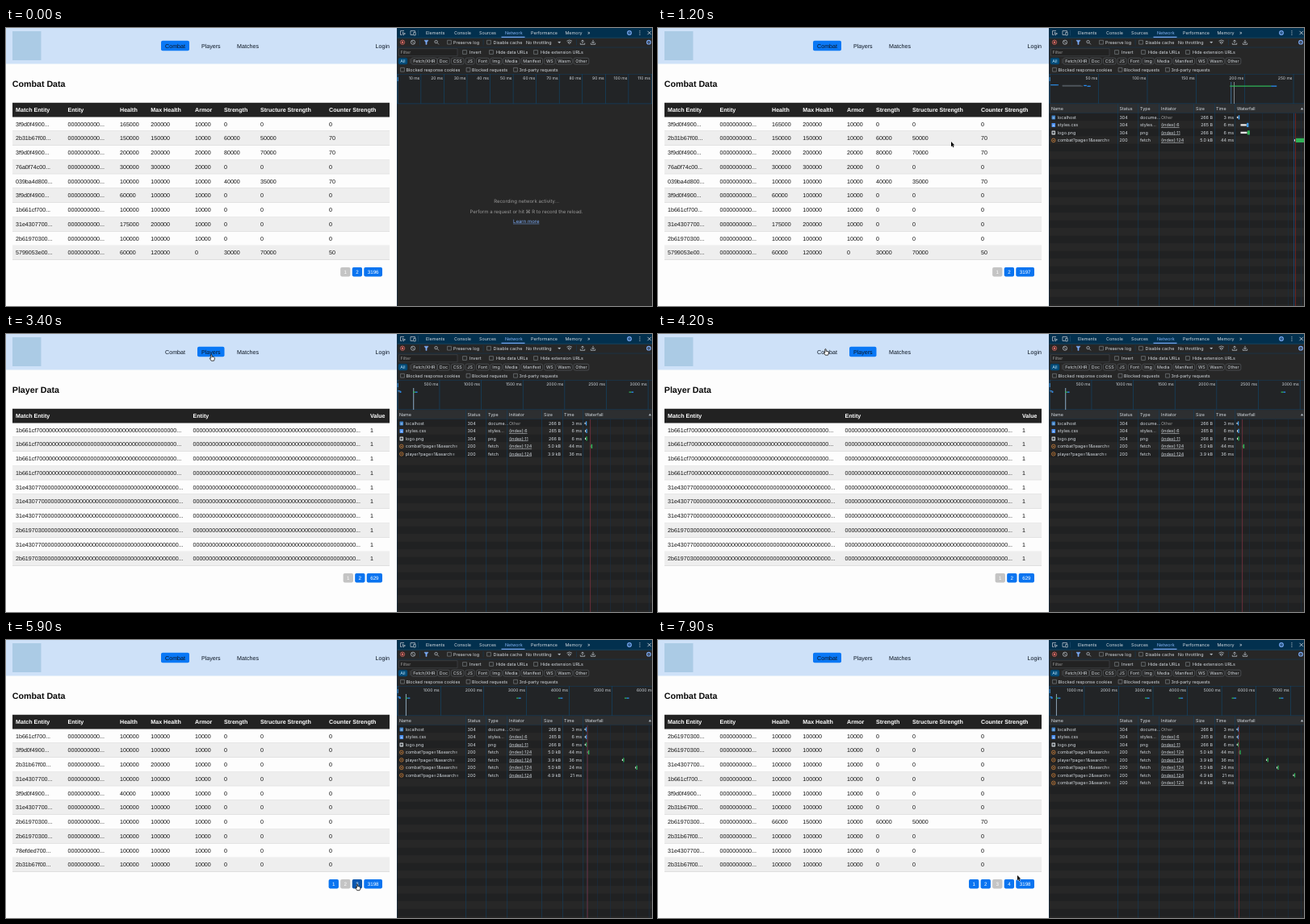
Animation, 800 px wide and 345 px high, one loop 8 s. Source, as an HTML page with a canvas:

```html
<!DOCTYPE html>
<html lang="en">
<head>
<meta charset="utf-8">
<title>Combat Data</title>
<style>
  html, body { margin: 0; width: 100%; height: 100%; overflow: hidden; background: #fdfdfd; }
  canvas { display: block; }
</style>
</head>
<body>
<canvas id="stage" width="800" height="345"></canvas>
<script>
const ctx = document.getElementById('stage').getContext('2d');
const LOOP = 8000;

const font = (size, family, weight = '') => ({ css: `${weight} ${size}px ${family}`, drop: size * 0.36 });
const ARIAL = '"Liberation Sans", Arial, sans-serif';
const UI = 'Inter, Roboto, sans-serif';
const BODY = font(7.11, ARIAL), HEAD = font(7.11, ARIAL, 'bold'), TITLE = font(10.67, ARIAL, 'bold');
const PAGER = font(6.22, ARIAL), TOOL = font(5.4, UI), AXIS = font(5, UI), NOTE = font(6, UI);

const LINE = '#123f60', PALE = '#d6dce2', GREY = '#9a9a9a', ICON = '#b4bcc4', BLUE = '#7cacf8';

function rect(x, y, w, h, color, radius = 0) {
  ctx.fillStyle = color;
  ctx.beginPath();
  ctx.roundRect(x, y, w, h, radius);
  ctx.fill();
}

function stroke(path, color = ICON, width = 0.8, fill) {
  const p = typeof path === 'string' ? new Path2D(path) : path;
  if (fill) { ctx.fillStyle = fill; ctx.fill(p); }
  ctx.strokeStyle = color;
  ctx.lineWidth = width;
  ctx.stroke(p);
}

function ring(x, y, r, color = ICON, width = 0.8) {
  const p = new Path2D();
  p.arc(x, y, r, 0, 7);
  stroke(p, color, width);
}

// y is the vertical middle of the capitals
function text(str, x, y, f, color, align = 'left') {
  ctx.font = f.css;
  ctx.fillStyle = color;
  ctx.textAlign = align;
  ctx.fillText(str, x, y + f.drop);
  return ctx.measureText(str).width;
}

function link(str, x, y, f, color) {
  const w = text(str, x, y, f, color);
  rect(x, y + f.drop + 0.7, w, 0.5, color);
}

/* ---------- data ---------- */

// entity, then health, max health, armor, strength, structure (thousands), counter
const DEFAULTS = [100, 100, 10, 0, 0, 0];
const parse = rows => rows.split(',').map(row => {
  const [id, ...stats] = row.split(' ');
  const values = DEFAULTS.map((d, i) => (stats[i] ?? d) * (i < 5 ? 1000 : 1));
  return [id + '00...', '0'.repeat(10) + '...', ...values];
});
const combatPages = [
  '3f9d0f49 165 200,2b31b67f 150 150 10 60 50 70,3f9d0f49 200 200 20 80 70 70,76a0f74c 300 300 20,' +
    '039ba4d8 100 100 10 40 35 70,3f9d0f49 60,1b661cf7,31e43077 175 200,2b619703,5799053e 60 120 0 30 70 50',
  '1b661cf7,3f9d0f49,2b31b67f 100 200,31e43077,3f9d0f49 40,31e43077,2b619703,2b619703,78efded7,2b31b67f',
  '2b619703,2b619703,31e43077,1b661cf7,3f9d0f49,2b31b67f,2b619703 66 150 10 60 50 70,2b31b67f,31e43077,2b31b67f'
].map(parse);

const [A, B, C] = ['1b661cf7', '31e43077', '2b619703'];
const players = [A, A, A, A, B, B, B, C, B, C]
  .map(id => [id.padEnd(51, '0') + '...', '0'.repeat(51) + '...', 1]);

const combatColumns = {
  'Match Entity': 12, 'Entity': 76.5, 'Health': 141, 'Max Health': 179.3, 'Armor': 234,
  'Strength': 270, 'Structure Strength': 315, 'Counter Strength': 400
};
const playerColumns = { 'Match Entity': 12, 'Entity': 231.5, 'Value': 451 };

// start, wait and download in ms
const req = (name, status, type, initiator, size, time, start, wait, load, color) =>
  ({ name, status, type, initiator, size, time, start, wait, load, color });
const api = (name, size, time, start) =>
  req(name + '&search=', 200, 'fetch', '(index):124', size + ' kB', time, start, 4, time, '#2fb457');
const requests = [
  req('localhost', 304, 'docume...', 'Other', '266 B', 3, 1, 4, 4, '#3f9bea'),
  req('styles.css', 304, 'styles...', '(index):6', '265 B', 6, 13, 19, 6, '#3f9bea'),
  req('logo.png', 304, 'png', '(index):11', '266 B', 6, 13, 21, 8, '#2fb457'),
  api('combat?page=1', '5.0', 44, 185),
  api('player?page=1', '3.9', 36, 2775),
  api('combat?page=1', '5.0', 24, 3750),
  api('combat?page=2', '4.9', 21, 5300),
  api('combat?page=3', '4.9', 19, 6670)
];

// span: ms across the overview; rate: waterfall px per ms
const scenes = [
  { at: 0, page: 1, last: 3196, count: 0, tick: 10, span: 110.3 },
  { at: 800, page: 1, last: 3197, count: 4, tick: 50, span: 261, rate: 0.384 },
  { at: 3400, page: 1, last: 629, count: 5, tick: 500, span: 3050, rate: 0.036, players: true },
  { at: 4400, page: 1, last: 3198, count: 6, tick: 500, span: 3780, rate: 0.0239 },
  { at: 5900, page: 2, last: 3198, count: 7, tick: 1000, span: 5940, rate: 0.0167 },
  { at: 7300, page: 3, last: 3198, count: 8, tick: 1000, span: 7400, rate: 0.0132 }
];

// time, x, y of the pointer tip
const track = [
  [800, 180, -12], [1200, 363, 141], [1400, 363, 141], [1500, 352, 136], [1700, 316, 158],
  [1850, 316, 158], [2200, 258, 30], [2400, 258, 30], [2600, 254.5, 25.5], [3600, 254.5, 25.5],
  [4150, 207.5, 18.5], [4700, 207.5, 18.5], [5000, 427.7, 309.7], [5500, 435, 303],
  [6250, 435, 303], [6600, 447, 305], [6750, 447, 305], [6900, 440, 304],
  [7600, 440, 304], [7900, 445, 292]
];

function pointerAt(t) {
  if (t < track[0][0]) return null;
  const i = track.findIndex(k => k[0] > t);
  if (i < 0) return track.at(-1).slice(1);
  const [t0, x0, y0] = track[i - 1], [t1, x1, y1] = track[i];
  const u = (t - t0) / (t1 - t0), e = u * u * (3 - 2 * u);
  return [x0 + (x1 - x0) * e, y0 + (y1 - y0) * e];
}

/* ---------- web page ---------- */

const within = (p, x, y, w, h) => p && p[0] >= x && p[0] <= x + w && p[1] >= y && p[1] <= y + h;

// Both return whether the pointer is over a button
function drawNav(scene, pointer) {
  rect(0, 0, 484, 44.5, '#cee1f8');
  rect(8, 4, 35.5, 36, '#abcbe5');
  let over = false;
  [['Combat', 192, 35], ['Players', 237, 33.5], ['Matches', 281, 37]].forEach(([name, x, w], i) => {
    if (i === (scene.players ? 1 : 0)) rect(x, 15.7, w, 12.6, '#0a78f5', 2);
    text(name, x + w / 2, 22, BODY, '#0b1522', 'center');
    over ||= within(pointer, x, 15.7, w, 12.6);
  });
  text('Login', 475, 22, BODY, '#0b1522', 'right');
  return over;
}

function drawTable(columns, rows) {
  const xs = Object.values(columns), pitch = 17.76, top = 110.3;
  rect(8, 92.8, 467, 17.6, '#222');
  Object.entries(columns).forEach(([name, x]) => text(name, x, 101.6, HEAD, '#fff'));
  rows.forEach((row, i) => {
    const y = top + i * pitch;
    if (i % 2) rect(8, y, 467, pitch, '#eee');
    rect(8, y + pitch - 0.5, 467, 0.5, '#d2d2d2');
    row.forEach((cell, c) => text(cell, xs[c], y + 8.8, BODY, '#111'));
  });
}

function drawPager({ page, last }, pointer) {
  let right = 466, over = false;
  const labels = [last, ...Array.from({ length: page + 1 }, (_, i) => page + 1 - i)];
  for (const label of labels) {
    ctx.font = PAGER.css;
    const w = ctx.measureText(label).width + 8.9, x = right - w, current = label === page;
    const hover = !current && within(pointer, x, 297, w, 11.4);
    rect(x, 297, w, 11.4, current ? '#c4c4c4' : hover ? '#0a56ad' : '#0a74f0', 1.8);
    text(label, x + w / 2, 302.7, PAGER, '#fff', 'center');
    over ||= hover;
    right = x - 2.2;
  }
  return over;
}

function drawPage(scene, pointer) {
  rect(0, 0, 484, 345, '#fdfdfd');
  const overNav = drawNav(scene, pointer);
  text(scene.players ? 'Player Data' : 'Combat Data', 7.8, 69, TITLE, '#0a0a0a');
  if (scene.players) drawTable(playerColumns, players);
  else drawTable(combatColumns, combatPages[scene.page - 1]);
  return drawPager(scene, pointer) || overNav;
}

/* ---------- developer tools ---------- */

function checkbox(x, y, label, labelX) {
  stroke(`M${x - 2.4} ${y - 2.4}h4.8v4.8h-4.8z`, '#858b91', 0.6);
  text(label, labelX, y, TOOL, PALE);
}

function gear(x, y) {
  ring(x, y, 2.3, BLUE, 1.2);
  ring(x, y, 0.6, BLUE, 0.5);
}

function drawToolbars() {
  rect(484, 0, 316, 345, '#272727');
  rect(484, 0, 316, 11.8, '#02304e');
  rect(484, 11.8, 316, 0.6, '#0b4c78');
  stroke('M493 3.5h-4.5v5h2M491 5.5l3.5 1.5-1.6.6-.6 1.5z');
  stroke('M501 3.5h5.5v1.5M501 3.5v5h3M504.7 5.5h2.5v3.5h-2.5z');
  rect(510.5, 2.5, 0.5, 7, '#2a587a');
  const tabs = { Elements: 520, Console: 555, Sources: 586, Network: 618, Performance: 650, Memory: 692.5 };
  for (const name in tabs) text(name, tabs[name], 6, TOOL, name === 'Network' ? '#8ab8fa' : PALE);
  rect(613.5, 10.7, 29, 1.2, BLUE);
  text('»', 720, 5.4, NOTE, PALE);
  gear(772, 6);
  [3.8, 6, 8.2].forEach(y => rect(784.4, y - 0.5, 1, 1, PALE));
  stroke('M794.5 3.8l4.4 4.4m0-4.4l-4.4 4.4', PALE);

  ring(491, 17.7, 2.7, '#e46962');
  rect(489.8, 16.5, 2.4, 2.4, '#e46962', 0.4);
  ring(504, 17.7, 2.6);
  stroke('M502.2 15.9l3.6 3.6');
  rect(512.3, 14, 0.5, 7.5, LINE);
  stroke('M518 15.2h5l-1.9 2.6v2.6h-1.2v-2.6z', BLUE, 0.5, BLUE);
  ring(532.6, 17.1, 1.7);
  stroke('M534 18.4l2 2');
  checkbox(549, 17.7, 'Preserve log', 554);
  rect(590.8, 14, 0.5, 7.5, LINE);
  checkbox(598, 17.7, 'Disable cache', 603.5);
  text('No throttling', 644, 17.7, TOOL, PALE);
  stroke('M683.4 16.9h3.6l-1.8 2z', ICON, 0.2, ICON);
  stroke('M694.5 16.2q3.2-2.4 6.4 0M695.8 17.8q1.9-1.3 3.8 0l-1.9 2z');
  rect(706.2, 14, 0.5, 7.5, LINE);
  stroke('M714 19v-4m-1.7 1.6l1.7-1.7 1.7 1.7M711.3 18.6v1.7h5.4v-1.7');
  stroke('M727 14.8v4m-1.7-1.6l1.7 1.7 1.7-1.7M724.3 18.6v1.7h5.4v-1.7');
  gear(796, 17.7);
  rect(484, 23.8, 316, 0.5, LINE);

  stroke('M486.5 25.7h72.5v9h-72.5z', '#4c5258', 0.5, '#222');
  text('Filter', 488.5, 30.2, TOOL, GREY);
  checkbox(568, 30, 'Invert', 574);
  checkbox(601, 30, 'Hide data URLs', 607);
  checkbox(656, 30, 'Hide extension URLs', 662);

  const chips = { 'All': 486, 'Fetch/XHR': 502, 'Doc': 534.5, 'CSS': 551.5, 'JS': 569, 'Font': 582.5, 'Img': 600,
    'Media': 615.7, 'Manifest': 638, 'WS': 666.7, 'Wasm': 681, 'Other': 703 };
  for (const name in chips) {
    ctx.font = TOOL.css;
    const w = ctx.measureText(name).width + 4.6, p = new Path2D();
    p.roundRect(chips[name], 37.2, w, 7.8, 1.8);
    const on = name === 'All';
    stroke(p, on ? '#004a77' : '#696f75', 0.5, on ? '#004a77' : '#272727');
    text(name, chips[name] + 2.3, 41.1, TOOL, on ? '#c2e7ff' : PALE);
    if (on) rect(500, 38, 0.5, 6, '#555');
  }
  checkbox(491, 51.7, 'Blocked response cookies', 495.5);
  checkbox(572.5, 51.7, 'Blocked requests', 577);
  checkbox(631, 51.7, '3rd-party requests', 635.5);
}

function drawOverview({ tick, span, count }) {
  const left = 485, scale = 315 / span;
  rect(484, 57, 316, 37, '#222426');
  rect(484, 57, 316, 0.6, LINE);
  for (let ms = tick; ms <= span + tick; ms += tick) {
    const x = left + ms * scale;
    rect(x, 57, 0.6, 37, '#12496f');
    text(ms + ' ms', x - 1.3, 62.2, AXIS, PALE, 'right');
  }
  rect(484.5, 57, 0.8, 37, '#1b6ca8');
  rect(484, 61, 1.8, 5, '#3b8fd6');
  rect(484, 93.6, 316, 0.7, LINE);
  if (!count) return;
  rect(left + 186 * scale, 67, 0.7, 27, '#4d8fc4');
  rect(left + 189 * scale, 67, 0.7, 27, '#a9b3ba');
  requests.slice(0, count).forEach((r, i) => {
    const x = left + r.start * scale, y = i < 3 ? 70 + i * 0.8 : 71.5;
    const w = Math.max(i < 3 ? 3 : 5.5, (r.wait + r.load) * scale);
    const part = Math.min(0.88, 0.4 + scale);
    if (i === 1 || i === 2) rect(x, y, r.wait * scale, 1, '#555e64');
    else rect(x, y, w * part, 1.3, i ? '#2fb457' : '#2a86d9');
    rect(x + w * part, y, w * (1 - part), 1.3, '#2a8cf0');
  });
}

function drawIcon(i, x, y) {
  if (i > 2) {
    ring(x, y, 2.3, '#e08a3c', 0.7);
    rect(x - 1, y - 0.4, 2, 0.8, '#e08a3c');
  } else {
    rect(x - 2.3, y - 2.5, 4.6, 5, ['#3d7fc4', '#4b8ff0', '#c9ced2'][i], 0.6);
    if (i < 2) stroke(`M${x - 1.2} ${y}h2.4M${x - 1.2} ${y + 1.2}h2.4`, '#dcecff', 0.5);
    else rect(x - 1.3, y - 1.2, 2.6, 2.4, '#4a4f54');
  }
}

function drawRequests({ count, rate }) {
  const left = 716.5, pitch = 9.5;
  rect(484, 94.3, 316, 10.9, '#2d2f31');
  const heads = { Name: 487, Status: 571.5, Type: 597, Initiator: 623, Size: 666, Time: 691, Waterfall: 717 };
  for (const name in heads) text(name, heads[name], 100, TOOL, PALE);
  stroke('M796 101.2h3l-1.5-2.4z', ICON, 0.2, ICON);
  rect(484, 105.2, 316, 0.5, LINE);
  for (let y = 105.8, i = 0; y < 345; y += pitch, i++) rect(484, y, 316, pitch, i % 2 ? '#272727' : '#202122');
  [569, 594.5, 620.5, 663, 689, 714.5].forEach(x => rect(x, 94.3, 0.6, 251, LINE));
  for (let x = 732; x < 800; x += 16) rect(x, 105.8, 0.5, 240, '#16314a');

  requests.slice(0, count).forEach((r, i) => {
    const y = 110.9 + i * pitch;
    drawIcon(i, 489.8, y);
    text(r.name, 494.8, y, TOOL, PALE);
    text(r.status, 571.5, y, TOOL, PALE);
    text(r.type, 597, y, TOOL, PALE);
    if (i) link(r.initiator, 623, y, TOOL, PALE);
    else text(r.initiator, 623, y, TOOL, GREY);
    text(r.size, 687, y, TOOL, PALE, 'right');
    text(r.time + ' ms', 713, y, TOOL, PALE, 'right');
    const x = left + r.start * rate, wait = Math.max(1.1, r.wait * rate);
    rect(x, y - 1.2, wait, 2.4, '#e4e4e4');
    rect(x + wait + 0.3, y - 2.6, Math.max(1.3, r.load * rate), 5.2, r.color);
  });
  rect(left + 184 * rate, 105.8, 0.7, 240, '#1d4f86');
  rect(left + 189 * rate, 105.8, 0.8, 240, '#7d2626');
}

function drawTools(scene) {
  ctx.save();
  ctx.beginPath();
  ctx.rect(484, 0, 316, 345);
  ctx.clip();
  drawToolbars();
  drawOverview(scene);
  if (scene.count) drawRequests(scene);
  else {
    text('Recording network activity...', 644.5, 215, NOTE, GREY, 'center');
    text('Perform a request or hit ⌘ R to record the reload.', 644.5, 227.6, NOTE, GREY, 'center');
    link('Learn more', 628, 240, NOTE, BLUE);
  }
  rect(484, 0, 0.6, 345, '#15324a');
  ctx.restore();
}

/* ---------- pointer ---------- */

const ARROW = new Path2D('M0 0v6.2l1.4-1.2 1 2.2 1-.4-1-2.2h2z');
const HAND = new Path2D('M-.7 .4q.7-.9 1.3 0v2.3q2.8 0 3.2 1.2v1.8l-.8 2h-3.3l-2-3q-.2-1 1.6 0z');

function drawPointer([x, y], hand) {
  ctx.save();
  ctx.translate(x, y);
  if (hand) stroke(HAND, '#111', 0.8, '#fff');
  else {
    stroke(ARROW, '#fff', 1);
    ctx.fillStyle = '#000';
    ctx.fill(ARROW);
  }
  ctx.restore();
}

function draw(now) {
  const t = now % LOOP;
  const scene = scenes.findLast(s => s.at <= t);
  const pointer = pointerAt(t);
  ctx.textRendering = 'geometricPrecision';
  const hand = drawPage(scene, pointer);
  drawTools(scene);
  if (pointer) drawPointer(pointer, hand);
  requestAnimationFrame(draw);
}
requestAnimationFrame(draw);
</script>
</body>
</html>
```
